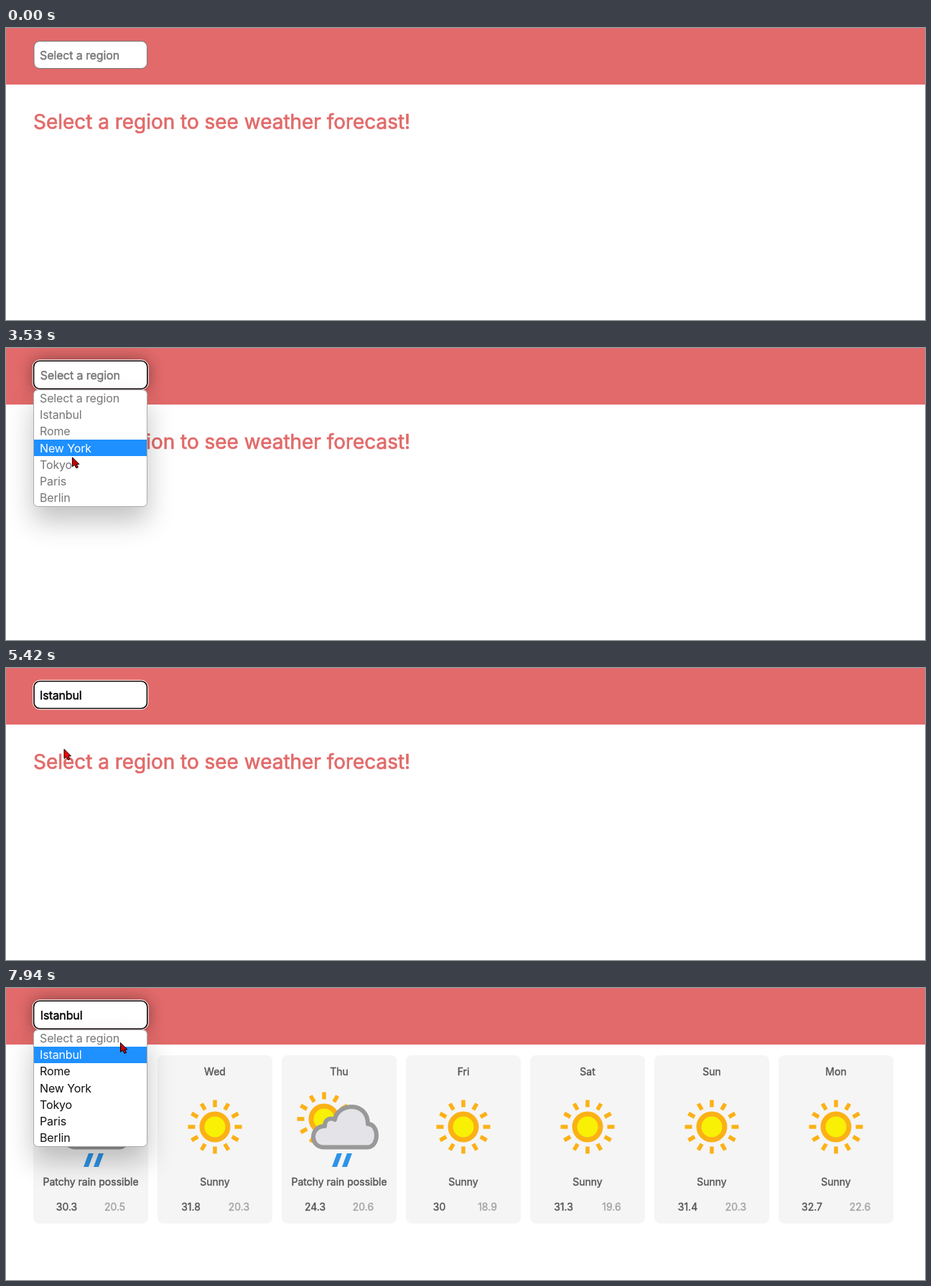
An HTML page for the animation above (8 s loop, 1280 by 408 pixels).

```html
<!DOCTYPE html>
<html lang="en">
<head>
<meta charset="utf-8">
<title>Weather forecast</title>
<style>
  html, body { margin: 0; width: 100%; height: 100%; overflow: hidden; background: #fff; }
  svg { display: block; width: 1280px; height: 408px; }
  text { font: 16px Inter, sans-serif; font-optical-sizing: none; letter-spacing: -.13px; }
  .bold { stroke: currentColor; stroke-width: .4; fill: currentColor; }
  #heading { font-size: 28px; letter-spacing: -.03px; stroke-width: .7; color: #e26a6a; }
  #cards text { font-size: 14px; letter-spacing: 0; text-anchor: middle; color: #555; }
  #cards .low { color: #a3a3a3; }
  #list { filter: drop-shadow(0 20px 18px rgba(0, 0, 0, .24)); }
</style>
</head>
<body>
<svg viewBox="0 0 1280 408">
  <defs>
    <g id="sun" stroke="#fbb116">
      <circle r="18" fill="#f8f005" stroke-width="7"/>
    </g>
    <g id="rain">
      <use href="#sun" x="59" y="183"/>
      <path d="M58 222.5C39 222 39 193 60 193C60 182 69 181 74 184C78 160 120 158 120 190C136 190 136 222 120 222.5Z"
        fill="#e4e4e8" stroke="#999" stroke-width="6" stroke-linejoin="round"/>
      <path d="M77 231h7l-7 19h-7zm14 0h7l-7 19h-7z" fill="#2e93e8"/>
    </g>
  </defs>
  <rect width="1280" height="79" fill="#e26a6a"/>
  <text id="heading" class="bold" x="38" y="141">Select a region to see weather forecast!</text>
  <g id="cards"></g>
  <rect id="box" fill="#fff"/>
  <rect id="ring" fill="none" stroke="#fff"/>
  <text id="value" class="bold" y="43.5"></text>
  <g id="popup">
    <rect id="list" x="38.5" y="57.5" width="158" height="163" rx="6" fill="#fff" stroke="#aaa"/>
    <rect id="mark" x="39" width="157" height="23" fill="#1e90ff"/>
    <g id="options"></g>
  </g>
  <path id="cursor" d="M0 0V13L3 10.5L5.5 15L8 14L6 9.5H9.5Z" stroke="#000"/>
  <circle id="click" r="12" fill="#ffeb00" opacity=".5"/>
</svg>
<script>
const $ = id => document.getElementById(id);
const LOOP = 8000, TICK = 1000 / 15, ROW = 23.2;
const OPEN = 2260, CHOOSE = 5270, LOADED = 5460, REOPEN = 7590;
const regions = ['Select a region', 'Istanbul', 'Rome', 'New York', 'Tokyo', 'Paris', 'Berlin'];
const forecast = ['Tue 30.3 20.5 rain', 'Wed 31.8 20.3', 'Thu 24.3 20.6 rain', 'Fri 30 18.9',
  'Sat 31.3 19.6', 'Sun 31.4 20.3', 'Mon 32.7 22.6'];

// key points of the pointer tip: time, x, y
const path = [
  [500, 674, 394], [560, 525, 326], [710, 525, 326], [1460, 293, 117], [1730, 252, 83],
  [2330, 147, 32], [3330, 108, 115], [3530, 92, 152], [4190, 80, 203], [4460, 74, 150],
  [4950, 71, 96], [CHOOSE, 71, 96], [6080, 209, 342], [6810, 195, 308], [7670, 168, 26],
  [7940, 159, 76]
];

for (let angle = 0; angle < 360; angle += 30)
  $('sun').innerHTML += `<path d="M27.5 0H37.5" stroke-width="5.5" transform="rotate(${angle})"/>`;

$('cards').innerHTML = forecast.map((line, i) => {
  const [day, high, low, rainy] = line.split(' ');
  const label = (x, y, s, cls = '') => `<text class="bold ${cls}" x="${x}" y="${y}">${s}</text>`;
  return `<g transform="translate(${38 + 173 * i})">
    <rect y="94" width="160" height="235" rx="8" fill="#f5f5f5"/>
    ${rainy ? '<use href="#rain"/>' : '<use href="#sun" x="80" y="194"/>'}
    ${label(80, 122, day)}${label(80, 276, rainy ? 'Patchy rain possible' : 'Sunny')}
    ${label(46.5, 310.5, high)}${label(113.5, 310.5, low, 'low')}</g>`;
}).join('');
$('options').innerHTML = regions.map((name, i) =>
  `<text x="47" y="${75 + ROW * i}">${name}</text>`).join('');

const between = (t, a, b) => t >= a && t < b;
const ramp = (t, a, b) => Math.min(1, Math.max(0, (t - a) / (b - a)));
const show = (id, on) => $(id).style.display = on ? '' : 'none';
const set = (id, attrs) => { for (const k in attrs) $(id).setAttribute(k, attrs[k]); };

// speed at a key point: zero at turns, stops and ends
function slope(i, axis) {
  const a = path[i - 1], b = path[i], c = path[i + 1];
  if (!a || !c || (b[axis] - a[axis]) * (c[axis] - b[axis]) <= 0) return 0;
  return (c[axis] - a[axis]) / (c[0] - a[0]);
}

function pointer(t) {
  const next = path.findIndex(p => p[0] > t);
  if (next < 1) return path.at(next).slice(1);
  const a = path[next - 1], b = path[next], span = b[0] - a[0], u = (t - a[0]) / span;
  const ease = u * u * (3 - 2 * u);
  return [1, 2].map(axis => a[axis] + (b[axis] - a[axis]) * ease
    + span * u * (1 - u) * (slope(next - 1, axis) * (1 - u) - slope(next, axis) * u));
}

function draw(time) {
  const t = Math.floor((time + 8) / TICK) * TICK;
  const [x, y] = pointer(t);
  const chosen = t >= CHOOSE, focused = t >= OPEN - 60;
  const open = between(t, OPEN, CHOOSE) || t >= REOPEN;
  const lift = ramp(t, 1900, 2100) - ramp(t, 3650, 3850) + ramp(t, 7250, 7450);
  const shift = Math.round(lift);

  show('heading', t < LOADED);
  show('cards', t >= LOADED);

  const frame = g => ({ x: 39 - g, y: 18.5 - g, width: 157.5 + 2 * g, height: 38 + 2 * g, rx: 8 + g });
  const grow = lift * .5;
  set('box', { ...frame(grow), stroke: focused ? '#000' : '#767676', 'stroke-width': focused ? 1.7 : 1 });
  set('ring', frame(grow + 1.3));
  show('ring', focused);
  $('box').style.filter = lift > 0 ? `drop-shadow(0 0 11px rgba(0,0,0,${.45 * lift}))` : 'none';
  $('value').textContent = regions[chosen ? 1 : 0];
  $('value').style.color = chosen ? '#000' : '#757575';
  set('value', { x: 47 + lift * .8 });

  show('popup', open);
  $('popup').style.opacity = chosen ? 1 : ramp(t, OPEN - 60, OPEN + 130);
  set('popup', { transform: `translate(0 ${shift})` });
  // the highlight trails the pointer by one tick; the first entry is disabled
  let row = Math.floor((pointer(t - TICK)[1] - 58 - shift) / ROW);
  if (row < 1) row = chosen ? 1 : -1;
  show('mark', row > 0);
  set('mark', { y: Math.round(57.6 + ROW * row) });
  [...$('options').children].forEach((o, i) => o.setAttribute('fill',
    i === row ? '#fff' : chosen && i ? '#111' : '#757575'));

  show('cursor', t >= path[0][0] - 10);
  set('cursor', { transform: `translate(${x + .5} ${y + .5})`, fill: open ? '#c00' : '#f00' });
  show('click', [OPEN, CHOOSE, REOPEN].some(end => between(t, end - 150, end)));
  set('click', { cx: x, cy: y });
}

const start = performance.now();
(function tick() {
  draw((performance.now() - start) % LOOP);
  requestAnimationFrame(tick);
})();
</script>
</body>
</html>
```
